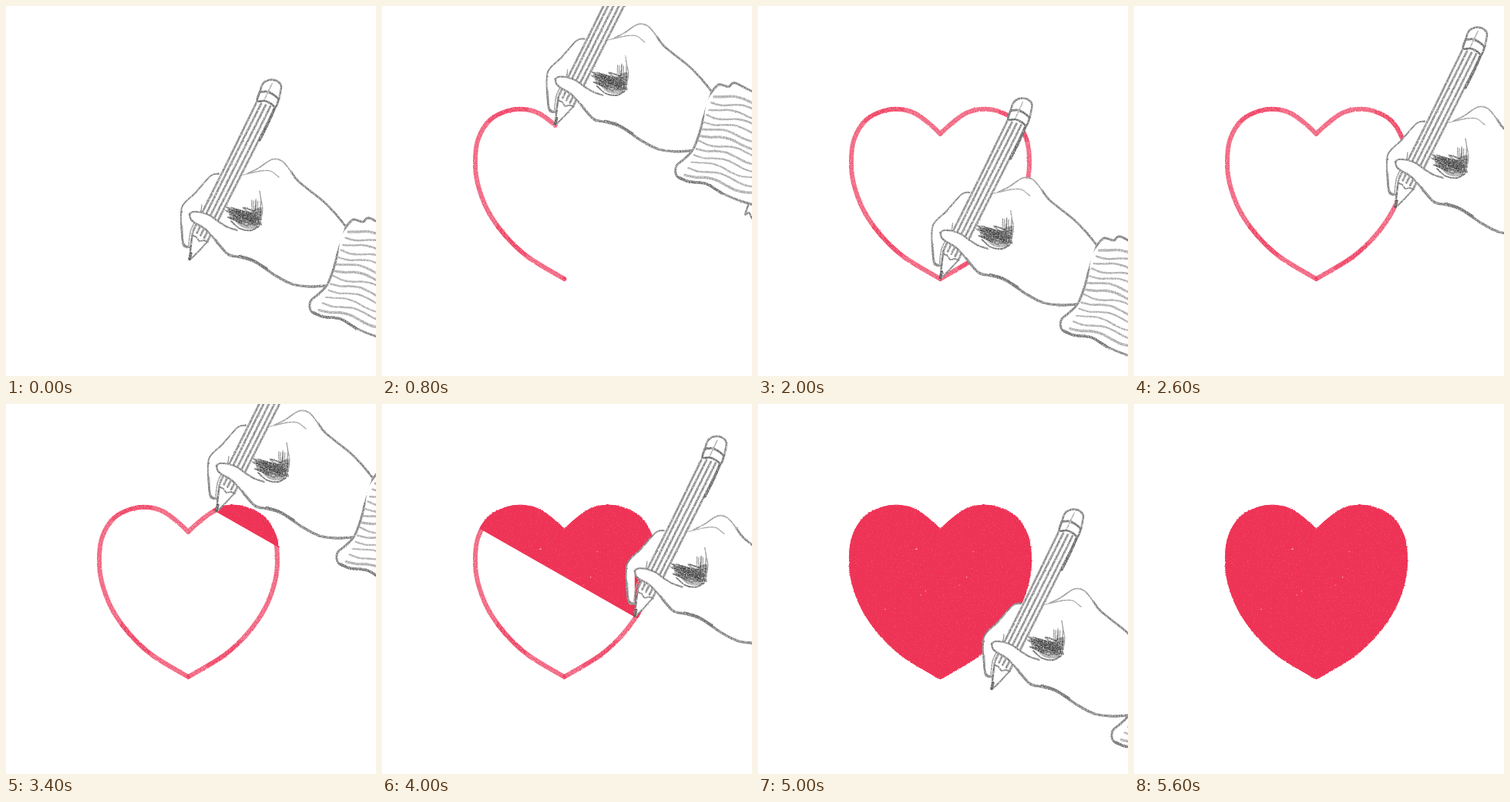
Write an HTML page that moves like this. It is 480 px wide and 480 px high and loops after 6400 ms.

```html
<!DOCTYPE html>
<html lang="en">
<head>
<meta charset="utf-8">
<title>Drawing a heart</title>
<style>
  html, body { margin: 0; width: 100%; height: 100%; overflow: hidden; background: #fff; }
  svg { display: block; width: 100vw; height: 100vh; }
  path { fill: none; stroke-linecap: round; stroke-linejoin: round; }
</style>
</head>
<body>
<svg viewBox="0 0 480 480">
  <defs id="defs"><clipPath id="done"><polygon id="edge"/></clipPath></defs>
  <g id="outline" filter="url(#crayon)"></g>
  <g clip-path="url(#done)"><g id="fill" filter="url(#wax)"></g></g>
  <g id="hand"><g id="sketch" filter="url(#graphite)"></g></g>
</svg>
<script>
const $ = id => document.getElementById(id);
const RED = '#ee3356';
const STEP = 200, LOOP = 6400, LAST = 28;

function add(parent, tag, attrs) {
  const el = document.createElementNS('http://www.w3.org/2000/svg', tag);
  for (const k in attrs) el.setAttribute(k, attrs[k]);
  return parent.appendChild(el);
}

let seed = 7;
const rnd = () => (seed = seed * 16807 % 2147483647) / 2147483647;
const lerp = (a, b, t) => a + (b - a) * t;
const mix = (p, q, t) => [lerp(p[0], q[0], t), lerp(p[1], q[1], t)];
const pairs = s => s.split(' ').map(p => p.split(',').map(Number));

// Linear interpolation between [step, value] keys
function track(keys, s) {
  let i = 0;
  while (i < keys.length - 2 && s > keys[i + 1][0]) i++;
  const [[a, v], [b, w]] = [keys[i], keys[i + 1]];
  return lerp(v, w, (s - a) / (b - a));
}

// Smooth curve through points
function curve(pts) {
  const p = typeof pts === 'string' ? pairs(pts) : pts;
  const at = i => p[Math.max(0, Math.min(p.length - 1, i))];
  let d = `M${p[0]}`;
  for (let i = 0; i < p.length - 1; i++) {
    const [a, b, c, e] = [at(i - 1), at(i), at(i + 1), at(i + 2)];
    d += `C${b[0] + (c[0] - a[0]) / 6},${b[1] + (c[1] - a[1]) / 6} ` +
         `${c[0] - (e[0] - b[0]) / 6},${c[1] - (e[1] - b[1]) / 6} ${c}`;
  }
  return d;
}

// White speckle laid over a drawing, with slightly ragged edges
function grain(id, gain, bias, rough) {
  const f = add($('defs'), 'filter', {
    id, filterUnits: 'userSpaceOnUse', x: 90, y: 60, width: 530, height: 480,
    'color-interpolation-filters': 'sRGB' });
  add(f, 'feTurbulence', { type: 'fractalNoise', baseFrequency: 0.6, numOctaves: 2, seed: 4, result: 'noise' });
  add(f, 'feColorMatrix', { values: '1 0 0 0 0 0 1 0 0 0 0 0 1 0 0 0 0 0 0 1', result: 'solid' });
  add(f, 'feDisplacementMap', { in: 'SourceGraphic', in2: 'solid', scale: rough,
    xChannelSelector: 'R', yChannelSelector: 'G', result: 'ragged' });
  add(f, 'feColorMatrix', { in: 'noise', values: `0 0 0 0 1 0 0 0 0 1 0 0 0 0 1 ${gain} 0 0 0 ${bias}`, result: 'specks' });
  add(f, 'feComposite', { in: 'specks', in2: 'ragged', operator: 'atop' });
}
grain('graphite', 1.6, -0.65, 1.8);
grain('crayon', 1, -0.4, 2);
grain('wax', 0.8, -0.5, 3);

// Heart: one half and its mirror image
const half = pairs('236.5,354 190,326 160,298 137,265 124,230 121,200 125,172 140,148 163,136 185,134 205,140 225,155 236.5,166');
const mirror = half.map(([x, y]) => [473 - x, y]).reverse();
const heart = curve(half) + curve(mirror).replace(/^M[^C]*/, '');
const line = add($('outline'), 'path', { d: heart, stroke: RED, 'stroke-width': 6, opacity: 0.78 });
const length = line.getTotalLength();
const pressed = [0, 1, 2, 3].map(i => ({
  from: 0.08 + 0.27 * i,
  el: add($('outline'), 'path', { d: heart, stroke: RED, 'stroke-width': 5, opacity: 0.7 })
}));
add($('fill'), 'path', { d: heart + 'Z', style: `fill:${RED}`, stroke: RED, 'stroke-width': 6 });
for (let i = 0; i < 8; i++)
  add($('fill'), 'circle', { cx: 165 + rnd() * 140, cy: 165 + rnd() * 110, r: 0.7, fill: '#fbc4d0' });

function dash(el, a, b) {
  el.style.display = b > a ? '' : 'none';
  el.setAttribute('stroke-dasharray', `0 ${a * length} ${(b - a) * length} ${length * 2}`);
}

// Hand, drawn with the pencil point at TIP
const TIP = [238, 330];
const sketch = $('sketch');
const white = points => add(sketch, 'polygon', { points, fill: '#fff' });
const ink = (pts, w = 2.4, stroke = '#808080', opacity = 1) =>
  add(sketch, 'path', { d: curve(pts), stroke, 'stroke-width': w, opacity });
function shape(pts, w) {
  white(pts);
  ink(pts, w);
}

// Wavy knit lines running between two edges
function knit(near, far, n) {
  for (let i = 0; i < n; i++) {
    const t = (i + 0.5) / n, phase = rnd() * 2, pts = [];
    const a = mix(near[0], near[1], t), b = mix(far[0], far[1], t);
    a[0] += 9 * Math.sin(t * Math.PI) * (t - 0.3);
    for (let k = 0; k <= 8; k++) {
      const [x, y] = mix(a, b, k / 8);
      pts.push([x, y + 3 * Math.sin(k * 1.25 + phase)]);
    }
    ink(pts, 2 + rnd() * 1.4, '#aaa');
  }
}

// Arm and cuff
shape('600,300 579,291 561,287 547,294 489,432 490,444 499,456 524,463 552,467 564,441 579,431 600,424');
ink('554,468 559,488 579,509 600,520');
knit([[556, 310], [515, 430]], [[600, 325], [550, 450]], 6);
shape('443,284 433,300 428,330 417,361 405,374 395,383 396,396 411,403 434,406 454,418 484,430 504,434 514,427 527,408 537,381 544,346 552,304 539,302 524,299 514,289 494,286 471,275 463,280 451,277 443,284', 3);
knit([[446, 286], [404, 396]], [[549, 306], [511, 428]], 13);
ink('398,397 411,403 434,406 454,418', 3.4, '#707070');

// Palm and fingers
const finger = '276,218 266,220 245,243 234,253 228,262 227,280 230,310 238,313';
const knuckles = '314,217 328,210 345,199 358,201 370,215';
const wrist = '370,215 380,228 410,252 426,268 440,285';
const thumbTop = '238,270 243,267 254,268 265,272 276,280 288,287 300,291';
const thumbTip = '238,270 240,277 246,282 258,289 272,304';
const thumbLow = '272,304 288,322 305,326 325,333 350,350 372,361 394,364 415,363';
white([finger, thumbTip, thumbLow, '440,285 410,252', knuckles.split(' ').reverse().join(' ')].join(' '));
ink(finger, 2);
ink('228,285 230,308 238,313', 2.6);
ink('254,258 252,268 240,290 237,312', 1.5, '#999');
ink('308,219 330,214 343,214 354,222', 1.3, '#999');
ink(knuckles, 1.7, '#999');
ink(wrist, 2.8);

// Shadow in the palm
add(sketch, 'path', { d: curve('288,268 300,264 316,267 331,261 331,278 326,288 306,287 288,268'), style: 'fill:#777', opacity: 0.6 });
for (let i = 0; i < 50; i++) {
  const x = 284 + rnd() * 26, y = 261 + rnd() * 14;
  const end = Math.min(331, x + 14 + rnd() * 14);
  ink([[x, y], [(x + end) / 2, y + 2 + rnd() * 4], [end, y + 4 + rnd() * 9]], 1.5, '#444', 0.6);
}
for (let i = 0; i < 10; i++) {
  const x = 318 + rnd() * 13;
  ink([[x - 4, 284], [x, 272], [x + 1, 250 + rnd() * 14]], 1.4, '#444', 0.55);
}
ink('329,240 331,252 333,264 330,282', 1.2, '#888');
ink('292,279 304,289 318,291 328,286', 1.8, '#666');

// Pencil
const eraser = '329,113 333,101 341,96 351,97 357,104 354,121';
white('325,124 ' + eraser + ' 350,131 262,306 238,330 243,291');
for (let k = 0; k < 5; k++) {
  const a = mix([325, 125], [349, 132], k / 4), b = mix([243, 291], [262, 304], k / 4);
  ink([a, mix(a, b, 0.5).map(v => v + rnd() - 0.5), b], 2.8, '#8a8a8a');
}
ink('349,131 341,150 329,174', 3.4, '#666');
ink(eraser, 2.6);
ink('329,112 338,111 347,115 354,121', 2.8, '#707070');
ink('329,112 326,123 336,123 344,127 350,131 354,120', 2.8, '#707070');
ink('345,101 336,120', 1.6, '#aaa');
ink('243,291 242,297 247,300 251,305 257,304 262,306', 2);
ink('242,294 240,310 238,329', 2.4, '#707070');
ink('261,306 251,317 239,329', 2);
ink('240,321 238,328', 3.4, '#555');

// Thumb
white(`${thumbTop} 300,326 288,322 272,304 258,289 246,282 240,277`);
ink(thumbTop, 2.2);
ink(thumbTip, 2.4);
ink(thumbLow, 3.4);
ink('303,325 320,330 338,341', 4, '#707070');

// Motion in steps: trace the outline, move away, shade side to side, leave
const TRACED = 10, SHADE = 15, FULL = 24, SLOPE = 0.57;
const drawn = [[1, 0.027], [4, 0.478], [8, 0.842], [10, 1]];
const depth = [[15, -43], [17, -15.6], [23, 194.6], [24, 218]];
const leftX = [[15, 325], [17, 273], [19, 152], [21, 129], [23, 139]];
const rightX = [[16, 350], [19, 350], [24, 239]];
const awayX = [[10, 237], [12, 330], [13, 339], [15, 325]];
const awayY = [[10, 354], [12, 414], [13, 262], [15, 142]];

function tipAt(s) {
  if (s === 0) return TIP;
  if (s <= TRACED) {
    const p = line.getPointAtLength(track(drawn, s) * length);
    return [p.x, p.y];
  }
  if (s < SHADE) return [track(awayX, s), track(awayY, s)];
  if (s <= FULL) {
    const x = track(s % 2 ? leftX : rightX, s);
    return [x, track(depth, s) + SLOPE * x];
  }
  return [239 + 64 * (s - FULL), 354 + 17 * (s - FULL)];
}

function show(s) {
  const [x, y] = tipAt(s);
  $('hand').style.display = s < LAST ? '' : 'none';
  $('hand').setAttribute('transform', `translate(${x - TIP[0]} ${y - TIP[1]})`);

  const part = s ? track(drawn, Math.min(s, TRACED)) : 0;
  dash(line, 0, part);
  for (const { from, el } of pressed) dash(el, from, Math.min(from + 0.07, part));

  // Shading ends on a slanted line through the pencil point
  const d = s < SHADE ? -400 : s < FULL ? track(depth, s) : 600;
  $('edge').setAttribute('points', `0,-500 480,-500 480,${d + SLOPE * 480} 0,${d}`);
}

const start = performance.now();
let current = -1;
function tick() {
  const t = (performance.now() - start) % LOOP;
  const s = Math.min(LAST, Math.floor(t / STEP));
  if (s !== current) show(current = s);
  requestAnimationFrame(tick);
}
tick();
</script>
</body>
</html>
```
